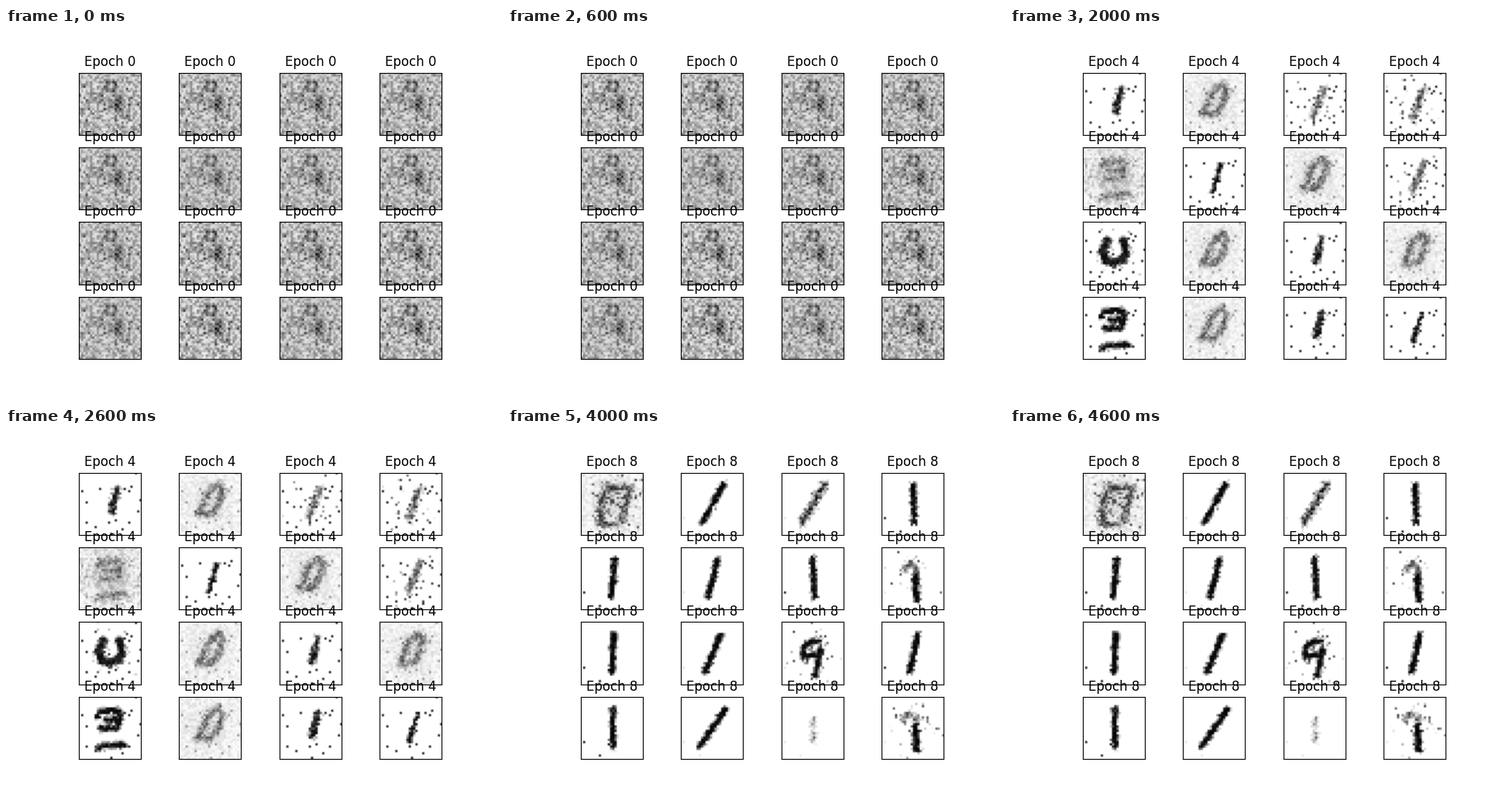
Animation of 640x480 px, one loop 5 s. Source, as a matplotlib script:

```python
import numpy as np
import matplotlib.pyplot as plt
from matplotlib.animation import FuncAnimation

N = 28
Y, X = np.mgrid[:N, :N] + 0.5
# how washed out each cell is in the first two steps
HAZE = [0.2, 0.35, 0.5, 0.5, 0.55, 1, 0.65, 0.5, 0.7, 0.1, 0.3, 0.1, 0.8, 0, 0.7, 0.15]


def dist(pts):
    """Distance of every cell to a polyline."""
    best = np.full((N, N), 99.0)
    for (ax, ay), (bx, by) in zip(pts, pts[1:]):
        dx, dy = bx - ax, by - ay
        t = np.clip(((X - ax) * dx + (Y - ay) * dy) / (dx * dx + dy * dy), 0, 1)
        best = np.minimum(best, np.hypot(X - ax - t * dx, Y - ay - t * dy))
    return best


def blob(x, y, sx, sy):
    return np.exp(-((X - x) / sx) ** 2 - ((Y - y) / sy) ** 2)


def merge(*layers):
    return np.clip(np.maximum.reduce(layers), 0, 1)


def draw(rng, paths, w, ink=1.0, fuzz=0.0, dust=0.0, fog=0.0):
    """Ragged strokes; fuzz blurs them, dust and fog dirty the paper."""
    d = np.minimum.reduce([dist(p) for p in paths])
    edge = (w / 2 - d + rng.normal(0, 0.35 + 0.25 * fuzz, (N, N))) / (1 + fuzz) + 0.5
    img = np.clip(edge, 0, 1) * ink * (1 - (0.08 + 0.4 * fuzz) * rng.random((N, N)))
    specks = (rng.random((N, N)) < dust * blob(15, 13, 9, 10)) * rng.random((N, N))
    haze = fog * (rng.random((N, N)) ** 1.5 + 0.6 * blob(14, 13, 8, 9))
    return merge(img, specks * 0.8, haze)


def slash(lean, top, bottom, x=14.3):
    return [[(x + lean / 2, top), (x - lean / 2, bottom)]]


def stamp(img, pts, ink=0.9):
    for x, y in pts:
        img[y, x] = max(img[y, x], ink)
    return img


def epoch0():
    rng = np.random.default_rng(10)
    base = 0.06 + 0.46 * rng.random((N, N)) ** 1.3
    base += (rng.random((N, N)) > 0.93) * 0.3
    ring = np.exp(-((np.hypot(X - 14.3, Y - 6.3) - 2.1) / 0.9) ** 2)
    base += 0.42 * ring + 0.34 * blob(17.7, 13.5, 1.9, 5)
    base += 0.25 * blob(9.5, 12.5, 1.6, 2.5) + 0.2 * blob(14.5, 14.5, 3, 2)
    base -= 0.15 * blob(13, 10.5, 1.5, 1.5)
    return [np.clip(base + 0.2 * h * (0.35 - base), 0, 1) for h in HAZE]


def epoch2():
    rng = np.random.default_rng(22)
    paper = 0.3 * rng.random((N, N)) ** 1.4
    paper += (rng.random((N, N)) > 0.87) * rng.uniform(0.2, 0.75, (N, N))
    paper += (rng.random((N, N)) < 0.4 * blob(12, 5, 9, 3)) * 0.45
    paper += 0.3 * blob(14, 11, 4, 8)
    body = [[(10.5, 5), (17, 4.5), (14.5, 6), (16, 9), (15.5, 12.5), (13, 13), (11.8, 10), (12.5, 6)]]
    legs = [[(13.5, 13), (14, 16), (11.5, 21.5)], [(14, 17), (16.5, 18), (16, 21.5)]]
    figure = merge(draw(rng, body, 2.5, 0.95, 0.5), draw(rng, legs, 2.6, 0.75, 0.8))
    cells = []
    for h in HAZE:
        back = np.clip(paper, 0, 1) ** (1.7 - 0.9 * h) + 0.22 * h * blob(14, 12, 8, 11)
        cells.append(merge(back, figure * (1 - 0.15 * h)))
    return cells


def epoch4():
    zero = [[(17.5, 5.5), (19.5, 8), (18, 13), (15.5, 18), (12, 19), (9, 18.5),
             (11, 14.5), (13, 9), (17.5, 5.5)]]
    three = [[(8.5, 9), (10, 6.7), (18, 6.7), (18.5, 10), (17, 14), (10, 14.5)],
             [(12, 10.5), (17, 10.5)], [(9, 22.8), (14, 22), (20, 21.5)]]
    ring = [[(11, 8.5), (8.8, 13), (10.5, 17.5), (14, 18.5), (18, 17), (19.5, 13), (18, 8.5)]]
    thin = slash(3.5, 8, 20, 15.2)
    styles = {
        "one": dict(paths=thin, w=2.0),
        "bold": dict(paths=slash(2.5, 7.5, 17.5, 15.8), w=2.9, fuzz=0.3),
        "soft": dict(paths=slash(5, 7.5, 20, 15.5), w=2.4, ink=0.8, fuzz=0.8, dust=0.12),
        "zero": dict(paths=zero, w=3.2, ink=0.72, fuzz=1.0, fog=0.13),
        "blur": dict(paths=three, w=2.8, ink=0.72, fuzz=1.0, fog=0.24),
        "three": dict(paths=three, w=2.8, fuzz=0.1),
        "ring": dict(paths=ring, w=3.8, fuzz=0.2, dust=0.1),
    }
    layout = ("bold zero soft soft blur one zero soft "
              "ring zero bold zero three zero bold one").split()
    marks = np.random.default_rng(7).integers(0, N, (18, 2))
    cells = []
    for k, kind in enumerate(layout):
        img = draw(np.random.default_rng(400 + k), **styles[kind])
        cells.append(stamp(img, marks, 0.4 if kind in ("zero", "blur") else 0.85))
    return cells


def epoch6():
    # slope of every "1"; None marks another glyph
    leans = [None, None, 9.5, 2, None, 2.8, 8, 3.5, 6, 1.2, 7.5, 4.6, 4.5, 4.8, 10.8, 8.8]
    letter = [[(20.5, 6), (18, 12), (17.5, 19)], [(9, 9), (11, 14), (10, 19)],
              [(8, 14.5), (18, 15.5)]]
    arc = [[(10.5, 15), (10.5, 11), (14.5, 8), (16, 13), (15.5, 24)]]
    marks = [(7, 5), (13, 5), (20, 4), (4, 14), (12, 27), (25, 0)]
    cells = []
    for k, lean in enumerate(leans):
        rng = np.random.default_rng(600 + k)
        if lean is None:
            paths, w, ink = (arc, 0.9, 1) if k == 1 else (letter, 1.9, 1 - 0.04 * k)
            cells.append(draw(rng, paths, w, ink, 0.7, 0.12))
        else:
            faint = k in (3, 10, 11)
            img = draw(rng, slash(lean, 6.7, 22.7), 3.7 - 0.1 * lean - 1.2 * faint,
                       fuzz=0.8 * faint, dust=0.2 * (k == 3))
            cells.append(stamp(img, marks, 0.4 if k == 3 else 0.9))
    return cells


def epoch8():
    leans = [None, 9, 9.5, -0.5, 1.7, 4.2, -0.7, None, 0.8, 7, None, 3.5, 0, 11.5, None, None]
    box = [[(9, 22.5), (9, 14), (11, 7.2), (22, 7.2), (20, 15), (18.5, 21)],
           [(8.5, 23), (16, 23)]]
    nine = [[(17, 8.3), (13.5, 8.5), (9.5, 12), (10, 15.5), (16.5, 15), (17.5, 12.5)],
            [(16.8, 14), (15.2, 24)]]
    hook = [[(10, 10), (13, 7.5), (15.5, 10.5)]]
    stem = [[(15.2, 13.5), (15.7, 23.7)]]
    cells = []
    for k, lean in enumerate(leans):
        rng = np.random.default_rng(800 + k)
        if k == 0:
            img = draw(rng, box, 2.6, 0.9, 0.9, 0.45, 0.15)
        elif k == 10:
            img = draw(rng, nine, 2.7, dust=0.18)
        elif k == 14:
            img = draw(rng, slash(0, 10.5, 20), 1.2, 0.7, 1)
        elif lean is None:
            img = merge(draw(rng, hook, 2.2, 0.8, 1, 0.1), draw(rng, stem, 3))
        else:
            img = draw(rng, slash(lean, 5.7, 22.3), 2.7, fuzz=0.9 * (k == 2))
        # upright shapes keep the stray corner marks
        upright = lean is not None and abs(lean) < 4
        cells.append(stamp(img, [(1, 20), (8, 26)], 0.85 if upright else 0.1))
    return cells


grids = [epoch0(), epoch2(), epoch4(), epoch6(), epoch8()]

fig, axes = plt.subplots(4, 4, figsize=(6.4, 4.8), dpi=100)
images, titles = [], []
for ax, cell in zip(axes.flat, grids[0]):
    images.append(ax.imshow(cell, cmap="gray_r", vmin=0, vmax=1))
    titles.append(ax.set_title("Epoch 0"))
    ax.set_xticks([])
    ax.set_yticks([])


def update(i):
    for image, title, cell in zip(images, titles, grids[i]):
        image.set_data(cell)
        title.set_text(f"Epoch {2 * i}")
    return images + titles


anim = FuncAnimation(fig, update, frames=len(grids), interval=1000,
                     repeat=True, repeat_delay=0)
plt.show()
```
